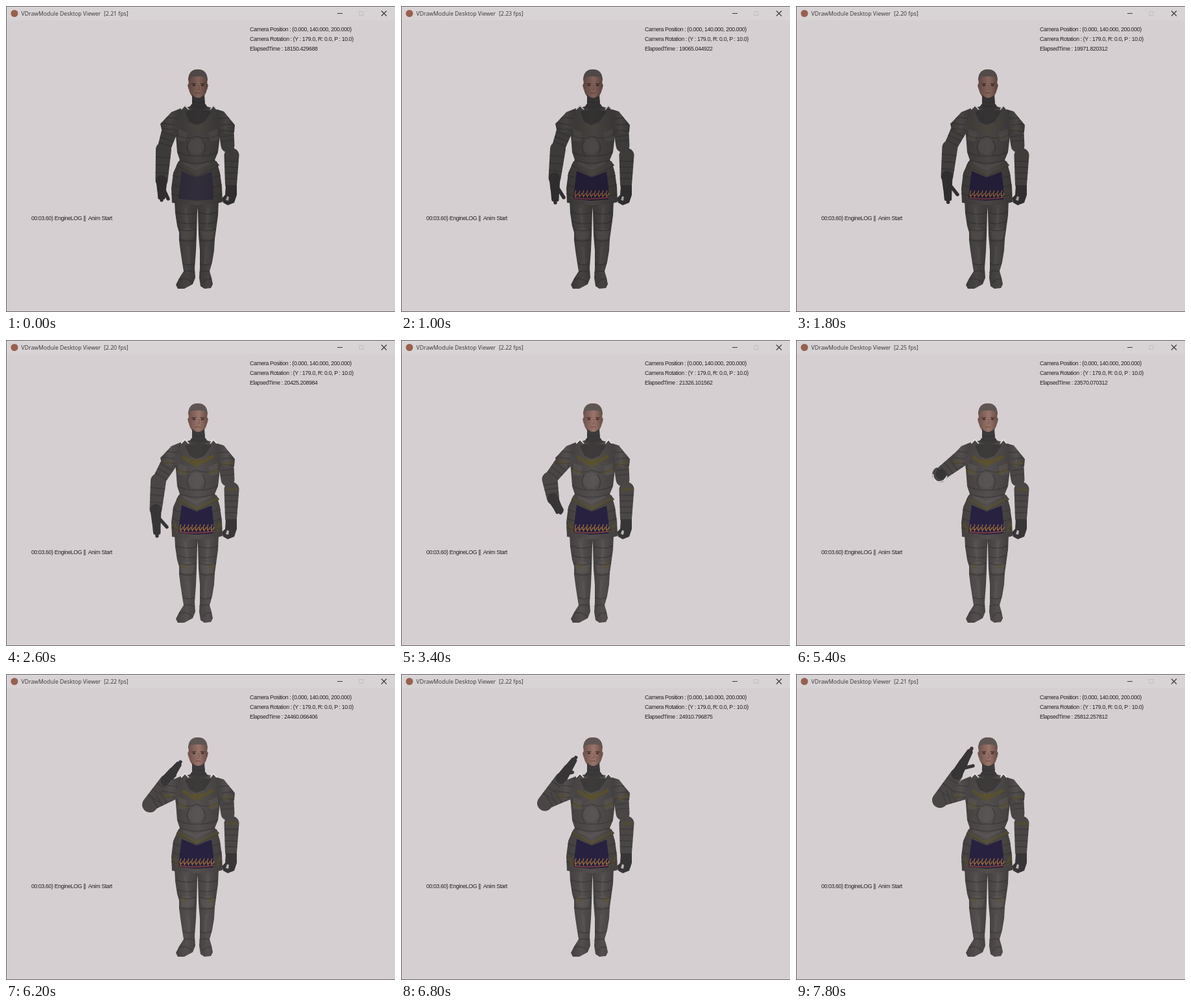
An HTML page that plays this animation: 600x473 px, repeating every 8 s.

```html
<!DOCTYPE html>
<html lang="en">
<head>
<meta charset="utf-8">
<title>Viewer</title>
<style>
  html, body { margin: 0; width: 100%; height: 100%; overflow: hidden; background: #d6cfd1; }
  svg { display: block; width: 100vw; height: 100vh; }
  text { white-space: pre; fill: #242122; font: 8.8px "Liberation Sans", Arial, sans-serif; letter-spacing: -.39px; }
  .title text { fill: #3a3537; font: 8.7px "Open Sans", "Noto Sans", sans-serif; letter-spacing: 0; }
  .plate { fill: url(#steel); }
  .limb { fill: #494645; }
  .seam { fill: none; stroke: #343131; stroke-width: 1.4; opacity: .55; }
  .shine { fill: none; stroke: #625e5c; stroke-width: 4; opacity: .4; }
  .light { fill: #676260; opacity: .35; }
  .hand { fill: #383537; }
  .finger { fill: none; stroke: #383537; stroke-width: 5.4; stroke-linecap: round; }
  .gold { fill: none; stroke: #5f5420; stroke-width: 5; stroke-linejoin: round; }
</style>
</head>
<body>
<svg viewBox="0 0 600 473" preserveAspectRatio="none">
  <defs>
    <linearGradient id="steel">
      <stop offset="0" stop-color="#423f3e"/>
      <stop offset=".5" stop-color="#534f4e"/>
      <stop offset="1" stop-color="#413e3d"/>
    </linearGradient>
    <linearGradient id="skin">
      <stop offset="0" stop-color="#6f524a"/>
      <stop offset=".55" stop-color="#9a756b"/>
      <stop offset="1" stop-color="#694d45"/>
    </linearGradient>
  </defs>

  <rect width="600" height="473" fill="#d6cfd1"/>
  <rect width="600" height="22" fill="#d8d3d4"/>
  <path d="M0 .5H600M.5 0V473M0 472.5H600" stroke="#696466"/>

  <g class="title">
    <circle cx="13" cy="11.5" r="5.5" fill="#97604f"/>
    <text x="23.5" y="15">VDrawModule Desktop Viewer</text>
    <text id="fps" x="151" y="15"></text>
    <path d="M511 11.5h8" stroke="#3c383a"/>
    <rect x="545" y="8.5" width="6" height="6" fill="none" stroke="#c3bcbe"/>
    <path d="M579 7.5l8 8m0-8l-8 8" stroke="#3c383a" stroke-width="1.1"/>
  </g>

  <text x="376" y="39">Camera Position : (0.000, 140.000, 200.000)</text>
  <text x="376" y="54">Camera Rotation : (Y : 179.0, R: 0.0, P : 10.0)</text>
  <text id="elapsed" x="376" y="69"></text>
  <text x="39" y="331">00:03.60) EngineLOG ||  Anim Start</text>

  <g id="figure">
    <!-- legs -->
    <g class="plate">
      <path d="M260 300L261 320L264 340L267 350L267 362L269 378L272 398L274 410L267 421L262 431L265 437L275 437L288 430L292 420L291 405L293 378L294 354L295 318L297 300Z"/>
      <path d="M295 300L296 320L297 354L299 378L299 405L298 420L300 433L306 437L316 436L319 430L317 420L314 410L318 396L321 378L322 360L324 346L327 324L328 300Z"/>
    </g>
    <path class="shine" d="M276 312L280 340M281 372L283 400M312 312L310 340M309 372L307 400"/>
    <path class="light" d="M269 346l12-4l10 5l-3 13l-17 0ZM300 347l10-5l12 4l-3 14l-16 0Z"/>
    <path class="seam" d="M261 318Q279 325 295 319M264 333Q280 339 294 335M266 345Q281 350 294 345M267 361Q281 366 293 361M273 398Q283 402 291 398M274 411Q283 407 291 412M267 423Q277 418 288 428
      M297 319Q312 325 327 318M298 335Q311 339 325 333M298 345Q310 350 324 345M298 361Q310 366 322 361M299 398Q307 402 317 398M298 412Q306 407 314 411M303 428Q310 419 317 423"/>

    <!-- hips and cloth -->
    <path class="plate" d="M266 240L258 258L255 282L256 304L268 306L296 308L322 306L334 303L333 280L330 258L325 240Z"/>
    <path class="seam" d="M257 262L270 266M256 276L268 280M255 290L267 294M331 262L318 266M333 276L320 280M333 290L321 294"/>
    <path id="cloth" d="M271 255L294 265L317 256L320 280L320 299L293 301L266 298L268 278Z" fill="#28213f"/>
    <g id="fringe" fill="none">
      <path d="M267 296.5Q293 300 320 296" stroke="#8a4240" stroke-width="1.5"/>
      <path id="tongues" stroke="#b07a38" stroke-width="1.1"/>
    </g>

    <!-- far arm -->
    <path id="upperR" class="limb"/><path id="foreR" class="limb"/>
    <path class="hand" d="M339 277L356 277L356 292L352 304L342 308L335 304L333 297L338 292Z"/>
    <path d="M339 300l2-6l3 1l-1 6Z" fill="#bdb6b8"/>
    <path id="bandsR" class="seam"/>

    <!-- torso -->
    <path class="plate" d="M284 155L268 160L258 172L262 200L264 226L268 238L263 246L294 264L329 246L322 238L327 226L330 200L334 172L326 160L309 155Z"/>
    <path d="M270 160L276 154L282 160M315 160L320 154L325 160" fill="#4a4746" stroke="#e8e3e3" stroke-width="1.7"/>
    <path d="M276 163Q296 157 317 163L306 179L294 184L283 179Z" fill="#353232" opacity=".7"/>
    <circle class="light" cx="293" cy="217" r="12"/>
    <path class="light" d="M266 190l14 6l-4 14l-11-2ZM312 196l14-6l2 17l-12 3ZM272 239l21 9l24-9l-2 5l-22 10l-20-9Z"/>
    <path class="seam" d="M262 198Q279 209 294 201Q310 209 330 198M265 226Q279 233 294 232Q310 233 326 226M268 238Q294 248 322 238M263 246L294 264L329 246M283 208Q275 219 284 231M303 208Q312 219 303 231"/>

    <!-- pauldron -->
    <path class="plate" d="M326 160L336 163L344 173L353 184L352 195L341 198L330 192Z"/>
    <path class="seam" d="M332 184L351 182M331 192L352 194M328 174L344 173"/>

    <!-- near arm -->
    <path id="upper" class="limb"/>
    <path id="fore" class="limb"/>
    <path id="bands" class="seam"/>
    <path id="rim" d="M211 207Q212 219 221 219Q229 219 233 210" fill="none" stroke="#e9e5e3" stroke-width="1.6"/>
    <path id="palm" class="hand"/>
    <path id="fingers" class="finger"/>
    <path class="plate" d="M270 158L255 164L246 174L238 182L240 191L250 196L262 192Z"/>
    <path class="seam" d="M241 181L261 184M240 190L261 191M248 172L265 174"/>

    <g id="trim">
      <path class="gold" d="M272 180L284 188L294 193L304 188L320 179"/>
      <path class="gold" d="M289 187h11l-6 7Z"/>
      <path class="gold" opacity=".6" d="M265 246L294 261L327 245M265 200L279 207M327 200L312 207M341 231L358 231M333 193L350 189M242 188L256 190M270 347L279 352M321 347L312 352M259 283L265 297M331 282L326 296"/>
    </g>

    <!-- head -->
    <path d="M281.5 114C281.5 102 288 98 296 98C304 98 310.5 103 310.5 114L310 128C309 137 303 144 296 144C289 144 283 137 282 128Z" fill="url(#skin)"/>
    <path d="M282 120q-3 1-1 6l1 4ZM310 120q3 1 1 6l-1 4Z" fill="#73544d"/>
    <path d="M281 116C281 102 288 98 296 98C304 98 311 102 311 116L308 111C303 108 289 108 284 111Z" fill="#5f5653"/>
    <path d="M286 120.5l7-.5M300 120l7 .5" stroke="#4f3a35" stroke-width="1.6"/>
    <path d="M288 122.6h4M301 122.6h4" stroke="#2f2426" stroke-width="1.8"/>
    <path d="M297 122l1 7l-3 1" fill="none" stroke="#75544c"/>
    <path d="M292 134.5h8" stroke="#754f47" stroke-width="1.3"/>
    <path d="M287 137Q296 147 306 137L307 151L312 158Q297 163 282 158L287 151Z" fill="#3d3a3c"/>
    <path class="seam" d="M287 147Q297 152 307 147M285 153Q297 158 309 153"/>
  </g>
</svg>

<script>
const LOOP = 8000, TICK = 200, FIRST = 395, STEP = 443;
const $ = id => document.getElementById(id);
const setPath = (id, d) => $(id).setAttribute('d', d);
const mix = (a, b, f) => a + (b - a) * f;
const ramp = (t, from, to) => Math.min(1, Math.max(0, (t - from) / (to - from)));

// update, elbow x y, wrist x y, fingertip x y, thumb x y, finger spread
const poses = [
  [0, 243, 222, 240, 270, 240, 300, 250, 298, 3],
  [2, 242, 221, 237, 266, 238, 304, 251, 296, 3],
  [5, 235, 218, 231, 262, 233, 303, 248, 289, 3],
  [9, 224, 213, 238, 228, 259, 231, 247, 241, 5],
  [12, 222, 208, 224, 207, 226, 206, 225, 207, 0],
  [14, 222, 202, 247, 165, 269, 136, 260, 157, 2],
  [17, 222, 195, 248, 155, 271, 115, 273, 142, 2]
];
const clock = [
  [0, 18150.429688], [2, 19065.044922], [5, 20425.208984], [9, 22226.996094],
  [12, 23570.070312], [14, 24460.066406], [17, 25812.257812]
];
const rates = [[0, 2.21], [2, 2.23], [4, 2.2], [7, 2.22], [9, 2.21], [10, 2.23], [12, 2.25], [13, 2.22], [16, 2.21]];

function sample(rows, k) {
  const i = Math.max(1, rows.findIndex(r => r[0] >= k));
  const a = rows[i - 1], b = rows[i], f = (k - a[0]) / (b[0] - a[0]);
  return a.map((v, n) => mix(v, b[n], f));
}

// six decimals of a single-precision value, ties to even
function floatText(value) {
  const micro = Math.round(value * 512) / 512 * 1e6, low = Math.floor(micro);
  const n = micro - low === .5 ? low + low % 2 : Math.round(micro);
  return (n / 1e6).toFixed(6);
}

function across(a, b) {
  const dx = b[0] - a[0], dy = b[1] - a[1], len = Math.hypot(dx, dy) || 1;
  return [-dy / len, dx / len];
}

// tapered segment with round ends
function limb(a, b, ra, rb) {
  const [nx, ny] = across(a, b);
  const at = (p, r) => `${p[0] + nx * r} ${p[1] + ny * r}`;
  return `M${at(a, ra)}A${ra} ${ra} 0 0 1 ${at(a, -ra)}L${at(b, -rb)}A${rb} ${rb} 0 0 1 ${at(b, rb)}Z`;
}

function bands(a, b, ra, rb, count) {
  const [nx, ny] = across(a, b);
  let d = '';
  for (let i = 1; i <= count; i++) {
    const f = i / (count + 1), r = mix(ra, rb, f);
    const x = mix(a[0], b[0], f), y = mix(a[1], b[1], f);
    d += `M${x + nx * r} ${y + ny * r}L${x - nx * r} ${y - ny * r}`;
  }
  return d;
}

function drawArm(k) {
  const [, ex, ey, wx, wy, tx, ty, hx, hy, spread] = sample(poses, k);
  const shoulder = [256, 182], elbow = [ex, ey], wrist = [wx, wy], tip = [tx, ty];
  const mid = [mix(wx, tx, .45), mix(wy, ty, .45)];
  const [nx, ny] = across(wrist, tip);
  setPath('upper', limb(shoulder, elbow, 13, 10));
  setPath('fore', limb(elbow, wrist, 12, 9.5));
  setPath('bands', bands(shoulder, elbow, 13, 10, 4) + bands(elbow, wrist, 12, 9.5, 3));
  setPath('palm', limb(wrist, mid, 8.5, 7));
  let d = `M${mix(wx, tx, .2)} ${mix(wy, ty, .2)}L${hx} ${hy}`;
  for (const s of [-1, 0, 1]) {
    const pull = Math.abs(s) * .12;
    d += `M${mid[0] + nx * s * 4} ${mid[1] + ny * s * 4}`
       + `L${mix(tx, wx, pull) + nx * s * spread} ${mix(ty, wy, pull) + ny * s * spread}`;
  }
  setPath('fingers', d);
  $('rim').style.opacity = Math.max(0, 1 - Math.abs(k - 12) / 2.5);
}

function drawStill() {
  const shoulder = [339, 186], sleeve = [342, 216], elbow = [348, 231], wrist = [347, 276];
  setPath('upperR', limb(shoulder, sleeve, 12, 10.5));
  setPath('foreR', limb(elbow, wrist, 11.5, 9));
  setPath('bandsR', bands(shoulder, sleeve, 12, 10.5, 3) + bands(elbow, wrist, 11.5, 9, 4));
  let d = '';
  for (let x = 270; x < 320; x += 6) d += `M${x} 296q-3-5 0-11M${x - 2} 292q3 3 5-3`;
  setPath('tongues', d);
}

function render(now) {
  const t = Math.floor(now % LOOP / TICK) * TICK;
  const k = Math.max(0, Math.floor((t - FIRST) / STEP) + 1);
  drawArm(k);
  $('elapsed').textContent = 'ElapsedTime : ' + floatText(sample(clock, k)[1]);
  const rate = rates.filter(r => r[0] <= k).pop()[1];
  $('fps').textContent = `[${rate.toFixed(2)} fps]`;

  const clear = ramp(t, 1600, 2600), early = ramp(t, 200, 1000);
  $('figure').style.filter = `brightness(${mix(.84, 1, clear)})`;
  $('trim').style.opacity = mix(.08, .65, clear);
  $('cloth').style.opacity = mix(.55, 1, early);
  $('fringe').style.opacity = early;
}

drawStill();
const start = performance.now();
function loop() {
  render(performance.now() - start);
  requestAnimationFrame(loop);
}
loop();
</script>
</body>
</html>
```
